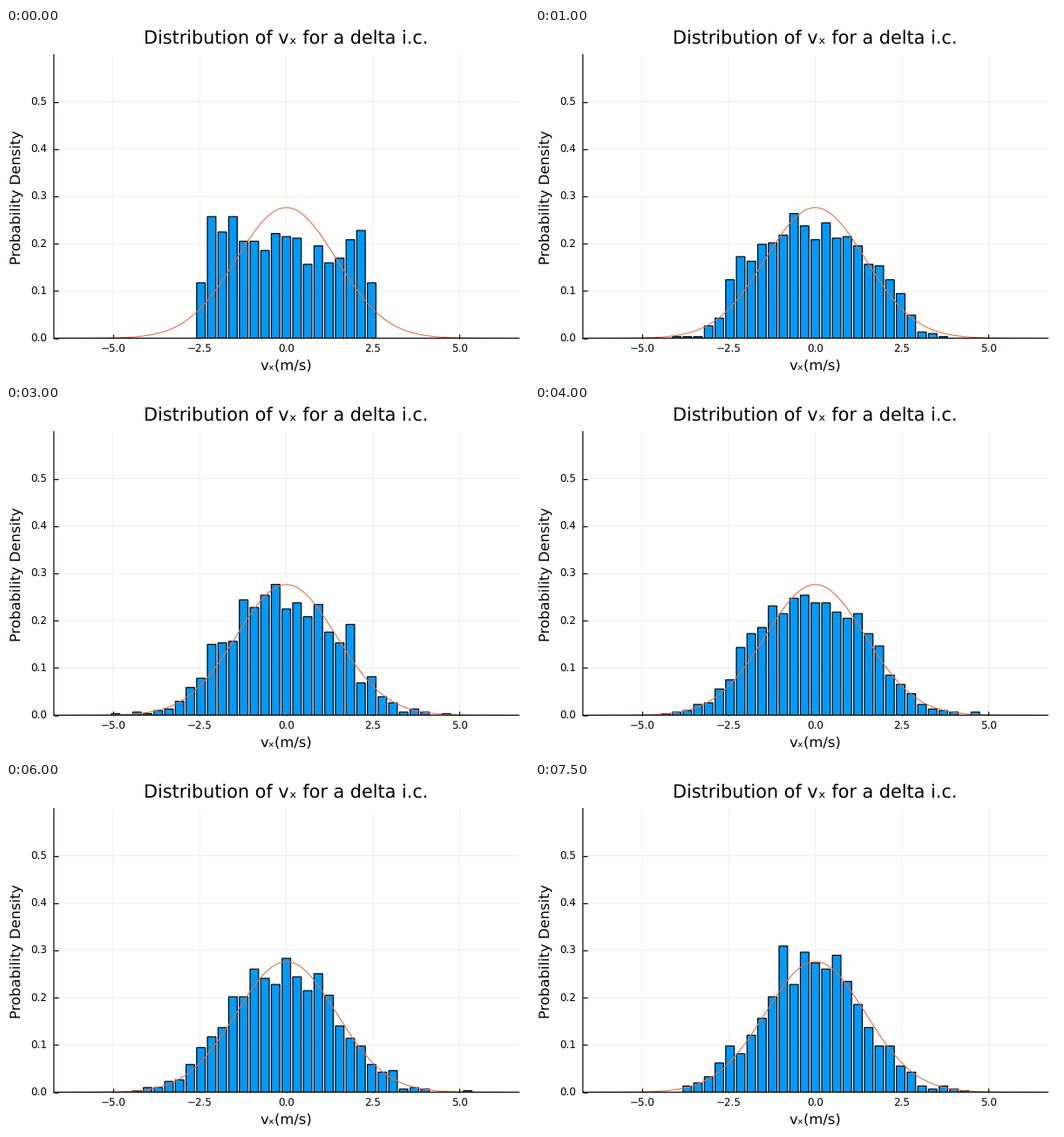
Animation, 600 px wide and 400 px high, one loop 8 s. Source, as a matplotlib script:

```python
import numpy as np
import matplotlib.pyplot as plt
from matplotlib.animation import FuncAnimation

W, H, DPI = 600, 400, 100
FRAMES, INTERVAL = 16, 500
PX = 72 / DPI                      # one pixel in points
N, SPEED = 1024, 2.5               # gas particles, common starting speed
BIN, STEP = 0.3, 0.308             # bin width, bar spacing
SIGMA = SPEED / np.sqrt(3)         # width of the equilibrium curve
X0, X_UNIT = 321.6, 39.74          # pixel of v = 0, pixels per m/s
LEFT, RIGHT, TOP, BOTTOM = 54.9, 588.5, 30.5, 355.5

plt.rcParams.update({"font.family": "DejaVu Sans", "text.hinting": "none",
                     "path.snap": False})

bins = np.arange(-20, 21)
edges = (np.arange(-20, 22) - 0.5) * STEP


def gauss(v):
    return np.exp(-v**2 / (2 * SIGMA**2)) / (SIGMA * np.sqrt(2 * np.pi))


def directions(rng, n):
    d = rng.normal(size=(n, 3))
    return d / np.linalg.norm(d, axis=1, keepdims=True)


def collide(rng, vel, pairs):
    """Elastic collisions: random pairs keep their mean and relative speed."""
    a, b = rng.permutation(N)[:2 * pairs].reshape(2, pairs)
    mean = (vel[a] + vel[b]) / 2
    half = np.linalg.norm(vel[a] - vel[b], axis=1, keepdims=True) / 2
    kick = half * directions(rng, pairs)
    vel[a], vel[b] = mean + kick, mean - kick


def simulate(seed=7):
    """Density of v_x in each frame, from equal speeds towards equilibrium."""
    rng = np.random.default_rng(seed)
    vel = SPEED * directions(rng, N)
    rows = []
    for _ in range(FRAMES):
        rows.append(np.histogram(vel[:, 0], edges)[0] / (N * BIN))
        for _ in range(4):
            collide(rng, vel, 64)
    return rows


density = simulate()

fig = plt.figure(figsize=(W / DPI, H / DPI), dpi=DPI, facecolor="white")
ax = fig.add_axes([LEFT / W, 1 - BOTTOM / H, (RIGHT - LEFT) / W, (BOTTOM - TOP) / H])
ax.set_xlim((LEFT - X0) / X_UNIT, (RIGHT - X0) / X_UNIT)
ax.set_ylim(0, 0.6)
ax.spines[["top", "right"]].set_visible(False)
ax.spines[["left", "bottom"]].set_linewidth(1.2 * PX)

xticks = np.arange(-5, 5.1, 2.5)
yticks = np.arange(6) / 10
ax.set_xticks(xticks, [])
ax.set_yticks(yticks, [])
ax.tick_params(direction="in", length=5 * PX, width=1.2 * PX)
ax.set_axisbelow(True)
ax.grid(color="black", alpha=0.1, linewidth=0.6 * PX)


def label(x, y, text, size, ha="center", **kw):
    fig.text(x / W, 1 - y / H, text, fontsize=size * PX, ha=ha, va="baseline", **kw)


label(321.6, 18.3, "Distribution of vₓ for a delta i.c.", 20.8)
label(321.8, 392, "vₓ(m/s)", 16.35)
label(16.5, 193.5, "Probability Density", 16.35, rotation=90, rotation_mode="anchor")
for v in xticks:
    label(X0 + v * X_UNIT, 371.9, f"{v:.1f}".replace("-", "−"), 11.9)
for p in yticks:
    label(47.2, BOTTOM - p * (BOTTOM - TOP) / 0.6 + 4.3, f"{p:.1f}", 11.9, ha="right")

bars = ax.bar(bins * STEP, density[0], width=0.8 * STEP, color="#009AFA",
              edgecolor="black", linewidth=1.2 * PX, zorder=2)
v = np.linspace(edges[0], edges[-1], 400)
ax.plot(v, gauss(v), color="#E26F46", linewidth=1.1 * PX, zorder=2.3)


def update(i):
    for bar, h in zip(bars, density[i]):
        bar.set_height(h)
        bar.set_visible(h > 0)
    return bars


anim = FuncAnimation(fig, update, frames=FRAMES, interval=INTERVAL,
                     repeat=True, repeat_delay=0, blit=False)
plt.show()
```
